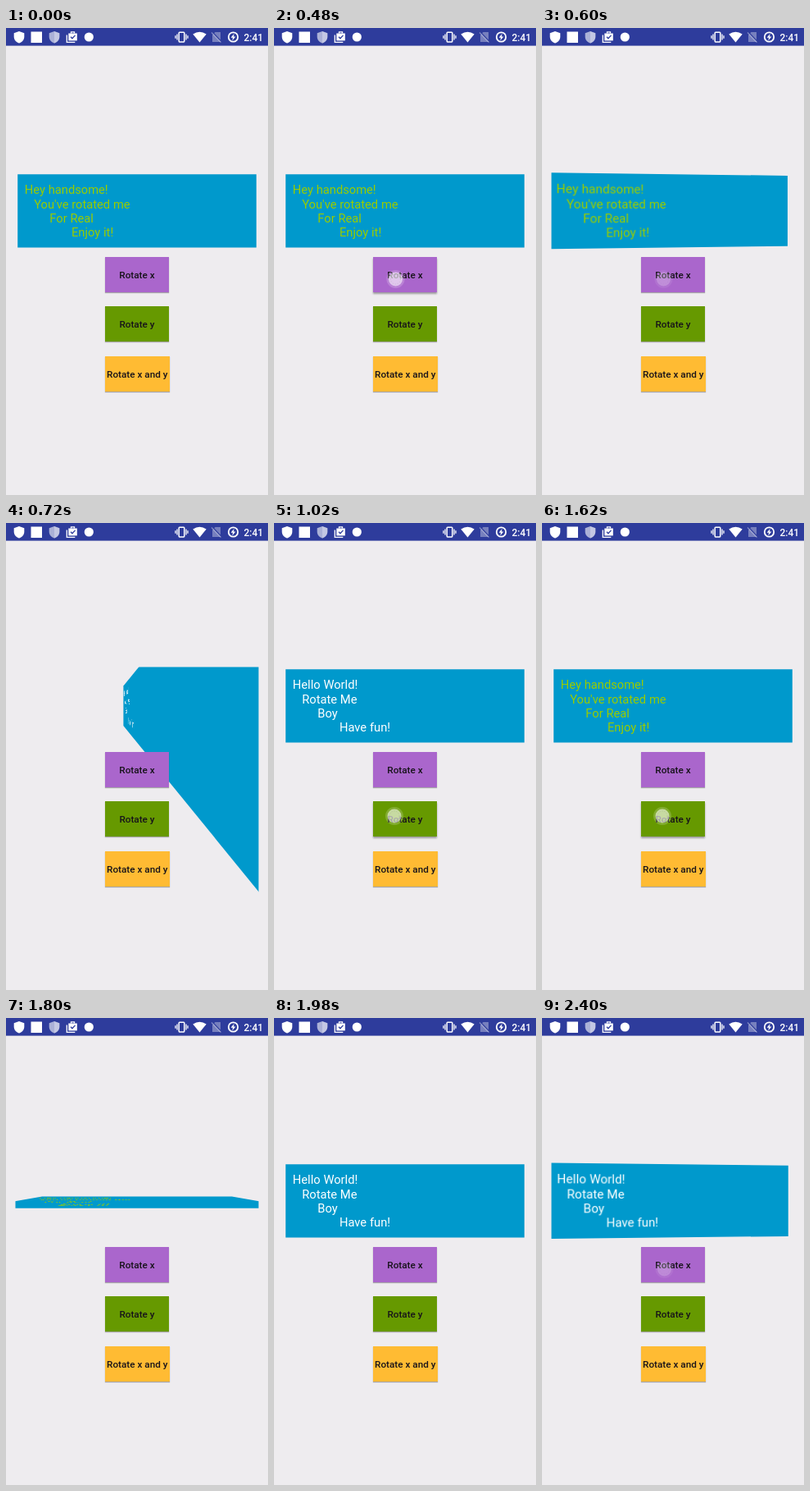
Animation, 320 px wide and 569 px high, one loop 2.46 s. Source, as an HTML page:

```html
<!DOCTYPE html>
<html lang="en">
<head>
<meta charset="utf-8">
<title>Card flip</title>
<style>
  html, body { margin: 0; width: 100%; height: 100%; overflow: hidden; background: #eeecef; }
  body { position: relative; font-family: Roboto, sans-serif; }
  svg { position: absolute; left: 0; top: 0; }
  #clip { position: absolute; left: 0; top: 0; width: 320px; height: 569px; clip-path: inset(175.5px 11.5px 0); }
  #label {
    position: absolute; left: 14px; top: 178px; width: 292px; height: 89.6px;
    font-size: 14.7px; line-height: 17.2px; word-spacing: .17px; white-space: pre;
  }
  #label span { position: absolute; left: 8.8px; top: 11.4px; }
  .button {
    position: absolute; left: 121px; width: 78px; height: 43px;
    font-size: 11.75px; font-weight: 500; line-height: 44px; text-align: center;
    white-space: nowrap; color: #17131a; box-shadow: 0 1px 1px rgba(0, 0, 0, .3);
  }
  .button.pressed { box-shadow: 0 2px 2px rgba(0, 0, 0, .35); }
</style>
</head>
<body>
<svg width="320" height="22" fill="#fff">
  <rect width="320" height="21.6" fill="#2e3c9c"/>
  <path id="shield" d="M16 3.9l6.3 2.4v4.1c0 3.9-2.6 6.8-6.3 8.1c-3.7-1.3-6.3-4.2-6.3-8.1v-4.1z"/>
  <use href="#shield" x="43" opacity=".6"/>
  <path d="M59 3.9l6.3 2.4v4.1c0 3.9-2.6 6.8-6.3 8.1z" opacity=".3"/>
  <rect x="30.5" y="4.5" width="13.5" height="13.5"/>
  <g fill="none" stroke="#fff" stroke-width="1.3">
    <path d="M74.3 8.5v8.8h10M79.5 6.5v-1.6h4v1.6"/>
    <rect x="211.2" y="5.3" width="6.6" height="11.6" rx=".8" stroke-width="1.5"/>
    <path d="M209 7.5v7M207 9.2v3.6M220 7.5v7M222 9.2v3.6"/>
    <circle cx="277.5" cy="11" r="5.7" stroke-width="1.8"/>
  </g>
  <path d="M76.3 6.5h10.5v8.9h-10.5z"/>
  <path d="M79 10.8l1.9 1.9l3.6-3.8" fill="none" stroke="#2e3c9c" stroke-width="1.3"/>
  <circle cx="101.3" cy="11" r="5.6"/>
  <path d="M228.3 7.6q8.2-5.6 16.4 0l-8.2 9.8z"/>
  <path d="M255.5 5h6.5v12h-10v-8.5z" opacity=".35"/>
  <path d="M252 5l11 11.5" stroke="#2e3c9c" stroke-width="1.5"/>
  <path d="M251 5.5l11.5 12" stroke="#fff" stroke-width="1.2" opacity=".4"/>
  <path d="M278.6 7l-4 4.8h2.4l-.6 3.4l4-4.8h-2.4z"/>
  <text x="290.6" y="15.5" font-size="11.9" font-weight="500">2:41</text>
</svg>

<div id="clip">
  <svg width="320" height="569"><polygon id="card" fill="#0099cc"/></svg>
  <div id="label"><span></span></div>
</div>
<div class="button" style="top:279px;background:#aa66cc">Rotate x</div>
<div class="button" style="top:339px;background:#669900">Rotate y</div>
<div class="button" style="top:400px;width:78.6px;background:#ffbb33">Rotate x and y</div>

<svg width="320" height="569">
  <g id="touch" fill="#fff">
    <circle r="11" opacity=".25"/>
    <circle r="8.5" opacity=".8"/>
    <circle r="6" fill="none" stroke="#999" stroke-dasharray="1 2" opacity=".35"/>
  </g>
</svg>

<script>
const LOOP = 2460, STEP = 60, CAMERA = 170.67, FADE = 40;
const CENTER = { x: 160, y: 222.8 }, HALF = { x: 145.8, y: 44.6 };
const faces = [
  { color: "#99cc00", text: "Hey handsome!\n   You've rotated me\n        For Real\n               Enjoy it!" },
  { color: "#fff", text: "Hello World!\n   Rotate Me\n        Boy\n               Have fun!" }
];
// Each flip turns 90° before and after `mid`, taking `half` ms each way.
const flips = [
  { axis: "Y", press: 480, mid: 710.7, half: 134, button: 0, x: 148.5, y: 306 },
  { axis: "X", press: 1020, mid: 1297, half: 146, button: 1, x: 147, y: 357 },
  { axis: "X", press: 1620, mid: 1808.5, half: 172, button: 1, x: 147, y: 357 },
  { axis: "Y", press: 2340, mid: 2530, half: 155, button: 0, x: 149.5, y: 306 }
];
const card = document.getElementById("card");
const label = document.getElementById("label");
const words = label.firstChild;
const touch = document.getElementById("touch");
const buttons = document.querySelectorAll(".button");

// Accelerates to edge-on, then decelerates from the other side.
function flipAngle({ mid, half }, t) {
  const u = (t - mid) / half;
  if (Math.abs(u) >= 1) return 0;
  return u < 0 ? 90 * (1 + u) ** 2 : -90 * (1 - u) ** 2;
}

function touchAlpha({ press, mid, half }, t) {
  if (t < press) return 0;
  const fade = (t - (mid - half)) / FADE;
  return 0.75 * Math.min(1, Math.max(0, 1 - fade));
}

// Perspective outline of the card turned by `angle` degrees.
function outline(axis, angle) {
  const sin = Math.sin(angle * Math.PI / 180), cos = Math.cos(angle * Math.PI / 180);
  return [[-1, -1], [1, -1], [1, 1], [-1, 1]].map(([sx, sy]) => {
    const x = sx * HALF.x, y = sy * HALF.y;
    const depth = axis === "Y" ? x * sin : -y * sin;
    const scale = CAMERA / (CAMERA + depth);
    return [
      CENTER.x + x * scale * (axis === "Y" ? cos : 1),
      CENTER.y + y * scale * (axis === "X" ? cos : 1)
    ];
  }).join(" ");
}

function draw(t) {
  const face = faces[flips.filter(f => t >= f.mid).length % 2];
  if (words.textContent !== face.text) words.textContent = face.text;
  words.style.color = face.color;

  const turning = flips.find(f => flipAngle(f, t));
  const axis = turning ? turning.axis : "X";
  const angle = turning ? flipAngle(turning, t) : 0;
  card.setAttribute("points", outline(axis, angle));
  label.style.transform = turning ? `perspective(${CAMERA}px) rotate${axis}(${angle}deg)` : "none";

  const touched = flips.find(f => touchAlpha(f, t) > 0);
  touch.setAttribute("opacity", touched ? touchAlpha(touched, t) : 0);
  if (touched) touch.setAttribute("transform", `translate(${touched.x} ${touched.y})`);
  const held = touched && !turning;
  buttons.forEach((b, i) => b.classList.toggle("pressed", !!held && touched.button === i));
}

const start = performance.now();
function tick() {
  const t = (performance.now() - start) % LOOP;
  draw(Math.floor(t / STEP) * STEP);
  requestAnimationFrame(tick);
}
tick();
</script>
</body>
</html>
```
